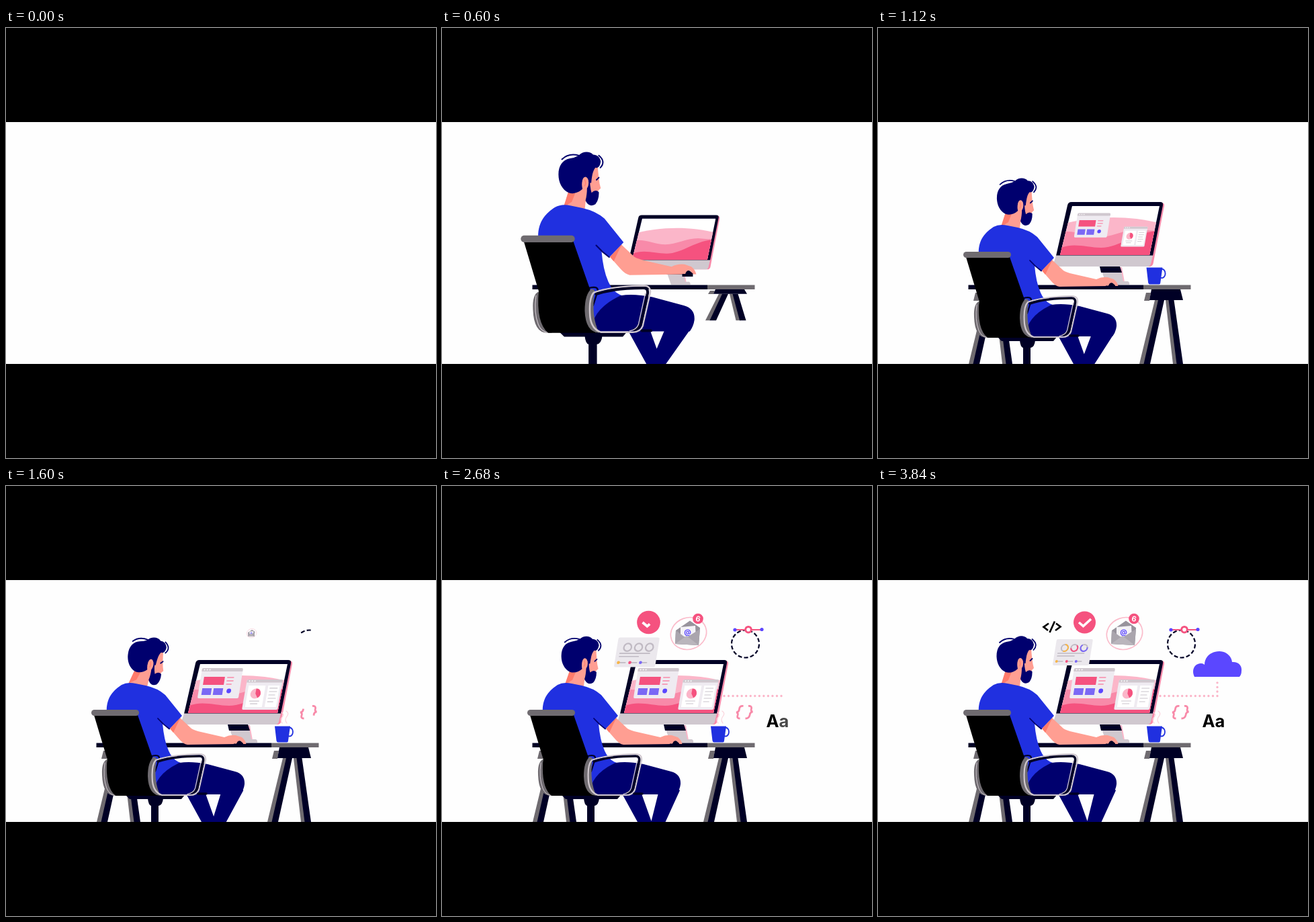
Recreate the animation shown at these times as an HTML page. Size 640x640 px, loop 5.04 s.

```html
<!DOCTYPE html>
<html lang="en">
<head>
<meta charset="utf-8">
<title>Designer at a desk</title>
<style>
  html, body { margin: 0; width: 100%; height: 100%; overflow: hidden; background: #fefefe; }
  svg { display: block; width: 100%; height: 100%; }
  text { font-family: Inter, "Open Sans", sans-serif; font-weight: 700; text-anchor: middle; }
  .line { fill: none; stroke-linecap: round; stroke-linejoin: round; }
  .navy { fill: #00006e; } .ink { fill: #000025; } .grey { fill: #6f6b70; } .pale { fill: #d0c8cf; }
  .blue { fill: #2030e0; } .skin { fill: #ff9e92; } .shade { fill: #ff7b6b; }
  .pink { fill: #f5527f; } .rose { fill: #f88aa9; } .blush { fill: #fbb6c9; } .violet { fill: #5b47ff; }
</style>
</head>
<body>
<svg viewBox="0 0 640 640">
  <defs>
    <clipPath id="screen"><path d="M289 265H419L404 338H271Z"/></clipPath>
  </defs>

  <path id="deskDark" class="ink"/>
  <path id="deskGrey" class="grey"/>
  <g id="trestles">
    <g id="trestle">
      <path id="legsGrey" class="grey"/>
      <path id="legsDark" class="ink"/>
      <path class="grey" d="M399 394H406L404 406H396Z"/>
      <path class="ink" d="M407 389H450L454 405H404Z"/>
    </g>
    <use href="#trestle" x="-254"/>
  </g>

  <g id="monitor">
    <path class="blush" d="M338 356H363L367 378H340Z"/>
    <path class="pale" d="M333 362H362L365 377H372Q375 379 374 382H340Z"/>
    <path class="ink" d="M330 355H360L363 364H332Z"/>
    <path class="rose" d="M300 260H421Q427 260 426 265L409.500 351Q408 355 404 355H300Z"/>
    <path class="ink" d="M288 259H420Q425 259 424 264L409 339H265L282 264Q283 259 288 259Z"/>
    <g clip-path="url(#screen)">
      <path fill="#fff" d="M260 260H430V340H260Z"/>
      <path class="blush" d="M270 293C320 279 375 278 425 292V340H270Z"/>
      <path class="rose" d="M270 304C295 300 310 311 330 311C350 311 365 300 388 300L425 303V340H270Z"/>
      <path class="pink" d="M268 329C290 318 310 327 332 327C360 327 385 302 420 302V340H268Z"/>
    </g>
    <path class="pale" d="M265 338.500H409L406 351Q405 355 401 355H264Q260 355 261 351Z"/>
  </g>

  <g id="win1"><g transform="translate(292 271) skewX(-9)">
    <rect width="61" height="45" rx="2" fill="#efebf1"/>
    <path class="pale" d="M2 0H59Q61 0 61 2V5H0V2Q0 0 2 0Z"/>
    <path class="line" stroke="#fff" stroke-width="2" stroke-dasharray="0 4" d="M4 2.5H13"/>
    <path class="pink" d="M5 13H36V25H5Z"/>
    <path class="line" stroke="#f88aa9" stroke-width="1.6" d="M40 14H49M40 19H49M40 24H47"/>
    <path fill="#7b68f5" d="M5 30H19V40H5ZM22 30H36V40H22Z"/>
    <circle class="violet" cx="45" cy="34" r="3.4"/>
  </g></g>

  <g id="win2"><g transform="translate(359 288) skewX(-10)">
    <rect width="53" height="45" rx="2" fill="#efebf1"/>
    <path class="pale" d="M2 0H51Q53 0 53 2V4.5H0V2Q0 0 2 0Z"/>
    <path class="line" stroke="#fff" stroke-width="2" stroke-dasharray="0 4" d="M4 2.3H13"/>
    <path fill="#fff" d="M4 9H29V41H4ZM33 9H50V41H33Z"/>
    <circle class="blush" cx="16" cy="21" r="7.5"/>
    <path class="pink" d="M16 21V13.500A7.500 7.500 0 0 1 20 27.400Z"/>
    <path class="line" stroke="#c9c3cc" stroke-width="1.2" d="M9 32H23M11 36H21M36 13H47M36 18H47M36 23H45M36 28H47M36 33H44"/>
  </g></g>

  <g class="line" id="steam" stroke="#fbd3dc" stroke-width="1.2">
    <path d="M411 353Q407 348 411 344T410 337M418 353Q414 348 418 343T417 335"/>
  </g>
  <g id="cup">
    <ellipse cx="422" cy="366" rx="5" ry="6.500" fill="none" stroke="#2030e0" stroke-width="1.8"/>
    <path class="blue" d="M400 357.500H423L420 379Q420 381.500 418 381.500H405Q403 381.500 402.500 379Z"/>
  </g>

  <g id="panel"><g transform="translate(266 228) skewX(-9)">
    <rect width="54" height="39" rx="2" fill="#ebe8ed"/>
    <g id="rings" fill="none" stroke="#c0bac3" stroke-width="2"></g>
    <path class="line" stroke="#c0bac3" stroke-width="1.5" d="M5 21H44M5 25H30M7 33H14M22 33H29M36 33H42"/>
    <circle cx="5" cy="33" r="2" fill="#f7b547"/>
    <circle class="pink" cx="20" cy="33" r="2"/>
    <circle cx="34" cy="33" r="2" fill="#7b68f5"/>
  </g></g>

  <g id="code">
    <path fill="none" stroke="#000" stroke-width="2.7" d="M254 204.500L246.500 209.800L253 215M263 201.500L255.500 218M265 204.500L271.500 209.500L264 215"/>
  </g>

  <g id="done">
    <circle class="pink" cx="307.500" cy="203" r="16.500"/>
    <path id="tick" fill="none" stroke="#fff" stroke-width="3.6" pathLength="1" stroke-dasharray="1 2" d="M299 203L305.500 208.500L317 198"/>
  </g>

  <g id="mail">
    <ellipse cx="367" cy="219.500" rx="27" ry="23.500" transform="rotate(-20 367 219.500)" fill="none" stroke="#fbbccb" stroke-width="1.7"/>
    <path fill="#98939c" d="M348 215L369 200.500L384 211L382 237L347 235Z"/>
    <path fill="#f4f2f6" d="M355 210L377 208L378 226L355 224Z"/>
    <path fill="#aaa5ad" d="M348 215L363 226L384 213L382 237L347 235Z"/>
    <path fill="#bab5bc" d="M347 235L364 223L382 237Z"/>
    <text x="365.500" y="221" font-size="10.500" class="violet" transform="rotate(-5 366 217)">@</text>
  </g>
  <g id="badge">
    <circle class="pink" cx="381" cy="197.500" r="7.800"/>
    <text x="381" y="201.500" font-size="11" fill="#fff" transform="rotate(12 381 197.500)">6</text>
  </g>

  <path id="dashes" fill="none" stroke="#000025" stroke-width="2.200" stroke-dasharray="6 3.200"/>
  <g id="handle">
    <path class="line" stroke="#f5527f" stroke-width="1.8" d="M436 214H476"/>
    <circle class="violet" cx="436" cy="214" r="2.600"/>
    <circle class="violet" cx="476" cy="213.500" r="2.600"/>
    <circle cx="456" cy="213.700" r="4.300" fill="#fff" stroke="#f5527f" stroke-width="3"/>
  </g>

  <g id="braces" fill="none" stroke="#f88aa9" stroke-width="2.8" stroke-dasharray="1 2">
    <path pathLength="1" d="M443.500 346Q438.500 346 440 341.500Q441.500 337.500 438 337Q442 336.500 442.500 332Q443 327 448.500 327.500"/>
    <path pathLength="1" d="M456 327.500Q461.500 327 460.500 331.500Q459 335.500 462.500 336Q458.500 336.500 458 341Q457 346 451.500 346"/>
  </g>
  <path id="dots" class="line" stroke="#fbb6c9" stroke-width="3.4" stroke-dasharray="0 6.540"/>
  <text x="499.500" y="359" font-size="25.500"><tspan id="capA">A</tspan><tspan id="lowA">a</tspan></text>
  <g id="cloud">
    <path class="violet" d="M471 284C466 274 471 264 481 264Q484 264 486 266C486 254 496 246 508 246C518 246 526 253 527 262C537 261 542 268 541 275Q541 281 538 284Z"/>
  </g>

  <g id="man">
    <path class="line" stroke="#d0c8cf" stroke-width="4" d="M217 400Q230 397 231 405L222 434"/>
    <g id="head">
      <path class="skin" d="M208 245L228 242Q229 256 230.500 265L232 271L229 274L226 286L212 289L211 300L183 298L190 274Z"/>
      <path class="shade" d="M190 274L199 276L194 289L183 296Z"/>
      <path class="navy" d="M217.500 253Q217.500 270 220 277Q225 272 229.500 276Q230 286 225 292Q216 297 212 287Q214 280 214 270Z"/>
      <path class="navy" d="M190 277C181 273 176.500 263 176.500 253C176.500 241 182 234 191 232Q198 231 203 228C208 222 218 222 222 227C227 227 231 230 232 236C231 243 228 245 225 244C221 249 220.500 256 219.500 264H216.500Q214.500 254 209.500 258Q206 264 208 272C203 277 196 279 190 277Z"/>
      <ellipse class="skin" cx="211.800" cy="264" rx="4.300" ry="8"/>
      <path class="line" stroke="#ff7b6b" d="M211 260Q213 264 211 268"/>
      <path class="line" stroke="#00006e" stroke-width="1.800" d="M181 233Q190 224.500 203 228M229.500 228Q239 236 231.500 244M226.500 260L229.500 257"/>
    </g>
    <path class="skin" d="M259 345L276 361Q281 364 290 366L325 374Q333 370 342 371L351 374Q356 378 357.500 384H353L349 379L343 384L270 385Q264 384 258 377L244 361Z"/>
    <path class="shade" d="M260 344L244 361L249 367Z"/>
    <path class="ink" d="M339 387V383.500H343Q345 378 349 379.500L353 383V387Z"/>
    <path class="blue" d="M150 340C148 315 160 304 172 296Q181 291 193 294L208 297Q226 301 237 311L262 342L243 362L233 353Q235 378 242 394Q248 408 260 412L245 445L215 455Z"/>
    <path class="line" stroke="#00006e" stroke-width="1.8" d="M226 346Q234 355 243 361.500"/>
    <path id="legs" class="navy"/>
    <path class="navy" d="M220 459Q220 430 258 412Q275 409 300 414L341 425Q356 429 355 444Q354 452 349 459Z"/>
    <path class="line" stroke="#000025" stroke-width="2" d="M217 402Q229 399 228 406L222 425"/>

    <path class="ink" d="M178 460H266L261 466H184Z"/>
    <path class="ink" d="M211 465H234Q233 475 227 476V530H216V476Q212 475 211 465Z"/>
    <path class="grey" d="M150 407Q142 411 143 430Q144 461 162 461H168L155 440Z"/>
    <path class="line" stroke="#d0c8cf" stroke-width="1" d="M147 412Q144 435 150 450Q154 460 163 460.500"/>
    <path d="M131 341H196L218 404Q211 425 214 443Q217 458 228 461H163Q147 448 150.500 406Z"/>
    <rect class="grey" x="127" y="333" width="71" height="9" rx="4.500"/>
    <path class="grey" d="M220 403Q211 410 211 432Q212 460 230 461Q219 440 224 405Z"/>
    <g class="line">
      <path stroke="#d0c8cf" stroke-width="2.200" d="M232 460H274Q284 460 287 452L297 408Q298 399 288 399Q245 400 223 408Q216 415 218 440Q220 456 232 460"/>
      <path stroke="#000025" stroke-width="3.600" d="M226 410Q250 402 288 402Q294.500 402 293.500 409L284.500 450Q282 456 276 457"/>
      <path stroke="#d0c8cf" stroke-width="1.200" d="M290.500 409L281.500 450Q279 457 270 458.500"/>
      <path stroke="#000025" stroke-width="3.500" d="M286 458H298"/>
    </g>
  </g>

  <path d="M0 0H640V140H0ZM0 500H640V640H0Z"/>
</svg>
<script>
const LOOP = 5040, STEP = 40, END = 3840;
const $ = id => document.getElementById(id);
const set = (id, name, value) => $(id).setAttribute(name, value);
const ramp = (t, a, b) => Math.min(1, Math.max(0, (t - a) / (b - a)));
const ease = (t, a, b) => { const u = ramp(t, a, b); return u * u * (3 - 2 * u); };

// Grow past full size, then settle back to 1.
function pop(t, start, peak, rise, fall = 240) {
  const u = ramp(t, start, start + rise);
  return peak * (1 - (1 - u) ** 2) - (peak - 1) * ease(t, start + rise, start + rise + fall);
}

// id: centre x, centre y, start, peak scale, rise time
const pops = {
  man: [200, 515, 40, 1.18, 480],
  monitor: [346, 382, 400, 1.275, 480],
  cup: [412, 382, 640, 1.15, 320],
  win1: [319, 294, 940, 1.15, 400],
  win2: [381, 311, 980, 1.15, 400],
  mail: [365, 219, 1550, 1.18, 400],
  handle: [456, 214, 1700, 1.11, 360],
  done: [307.5, 203, 2120, 1.2, 400],
  badge: [381, 197.5, 2160, 1.18, 300],
  panel: [290, 247.5, 2200, 1.18, 400],
  code: [258.5, 210, 2700, 1.18, 400],
  cloud: [504.5, 264, 3070, 1.19, 390]
};

function arc(cx, cy, r, from, sweep) {
  if (!sweep) return "";
  const point = deg => {
    const a = deg * Math.PI / 180;
    return `${cx + r * Math.cos(a)} ${cy + r * Math.sin(a)}`;
  };
  return `M${point(from)}A${r} ${r} 0 ${+(Math.abs(sweep) > 180)} ${+(sweep > 0)} ${point(from + sweep)}`;
}

const ringColors = ["#f7b547", "#f5527f", "#7b68f5"];
$("rings").innerHTML = ringColors.map((color, i) =>
  `<circle cx="${14 + 14.3 * i}" cy="13" r="5"/><path id="ring${i}" stroke="${color}"/>`).join("");

function desk(t) {
  const half = 165.5 * ramp(t, 40, 470), left = 300 - half, right = 300 + half;
  set("deskDark", "d", `M${left} 382.5H${Math.min(395, right)}V389H${left}Z`);
  set("deskGrey", "d", `M395 382.5H${Math.max(395, right)}V389H395Z`);

  const grow = ease(t, 520, 700), fold = 1 - ease(t, 760, 1000), a = 3 * fold, b = -1.5 * fold;
  set("trestles", "transform", `translate(0 389) scale(1 ${grow}) translate(0 -389)`);
  set("legsGrey", "d", `M412 405H420L${396 + a} 500H${389 + a}ZM428 405H434L${446 + b} 500H${439 + b}Z`);
  set("legsDark", "d", `M417 405H426L${405 + a} 500H${395.5 + a}ZM432.5 405H440.5L${454 + b} 500H${444.5 + b}Z`);
}

function body(t) {
  const m = 0.65 * ease(t, 760, 1600) + 0.35 * ease(t, 1600, 2400);
  set("legs", "d", `M268 458H297L319.5 521H302.5ZM${316 + 6 * m} 457L340 440L${352 + 2 * m} 453L${304 + 19 * m} 521H${289 + 17 * m}Z`);
  const tilt = 8 * (ease(t, 1000, 1700) - ease(t, 1700, 3100));
  set("head", "transform", `rotate(${tilt} 200 290)`);
}

function icons(t) {
  set("steam", "opacity", ramp(t, 1200, 1400));
  set("dashes", "d", arc(451.5, 235, 20.5, -84, -359.9 * ramp(t, 1500, 2200)));
  set("braces", "stroke-dashoffset", 1 - ramp(t, 1400, 1680));
  set("braces", "visibility", t > 1400 ? "visible" : "hidden");
  set("tick", "stroke-dashoffset", 1 - ramp(t, 2480, 2840));

  const run = 109 * ramp(t, 1900, 2890);
  set("dots", "d", run ? `M420 312.5H${420 + Math.min(85, run)}V${312.5 - Math.max(0, run - 85)}` : "");

  set("capA", "fill-opacity", ramp(t, 2360, 2600));
  set("lowA", "fill-opacity", ramp(t, 2480, 2760));
  ringColors.forEach((_, i) =>
    set("ring" + i, "d", arc(14 + 14.3 * i, 13, 5, -90 + 40 * i, (200 + 25 * i) * ease(t, 2900, 3700))));
}

function draw(now) {
  const t = Math.min(END, Math.floor(now % LOOP / STEP) * STEP);
  for (const [id, [x, y, ...timing]] of Object.entries(pops))
    set(id, "transform", `translate(${x} ${y}) scale(${pop(t, ...timing)}) translate(${-x} ${-y})`);
  desk(t);
  body(t);
  icons(t);
}

const begin = performance.now();
function tick() {
  draw(performance.now() - begin);
  requestAnimationFrame(tick);
}
tick();
</script>
</body>
</html>
```
